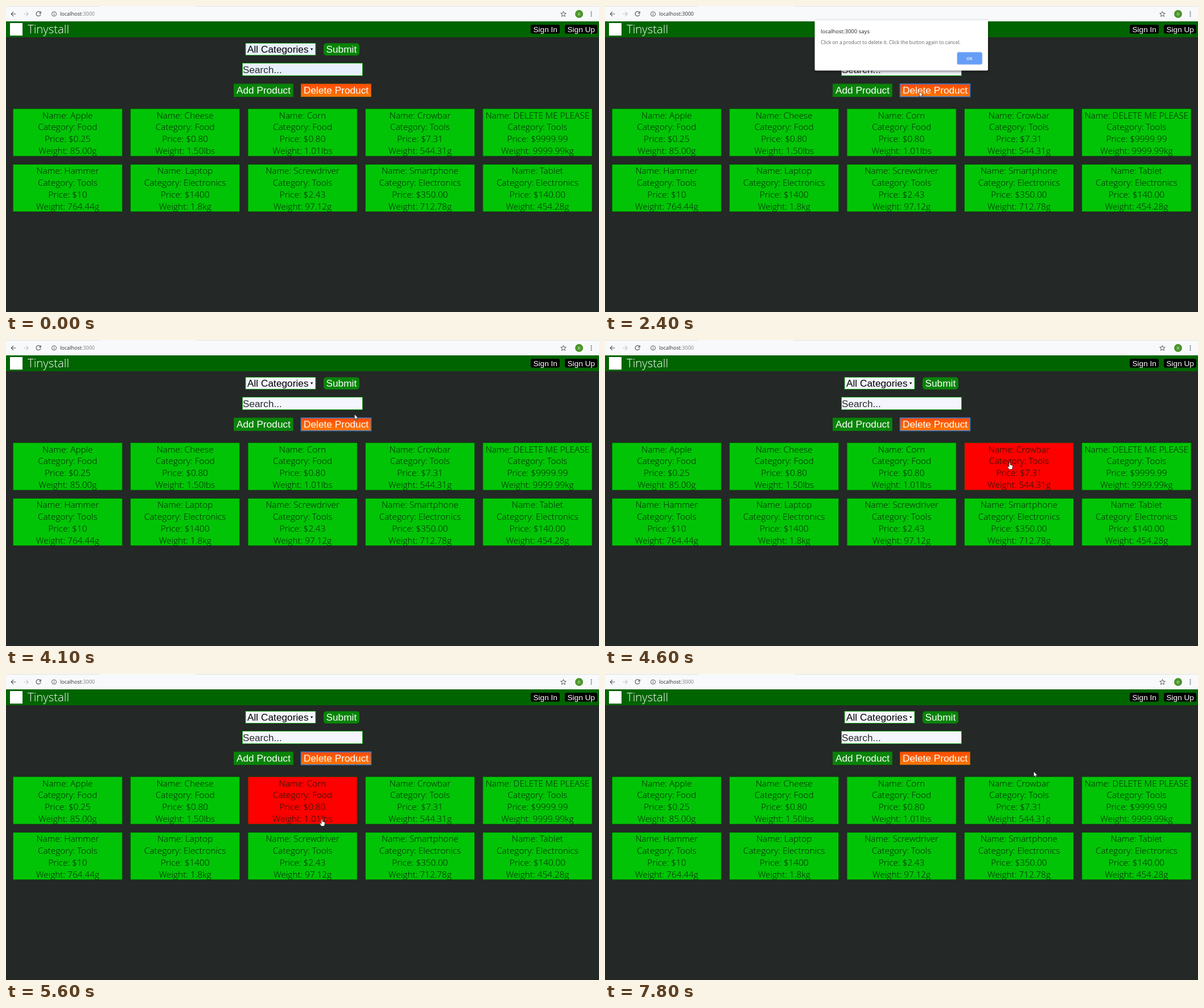
Write an HTML page that moves like this. It is 1042 px wide and 538 px high and loops after 8 s.

```html
<!DOCTYPE html>
<html lang="en">
<head>
<meta charset="utf-8">
<title>Shop demo</title>
<style>
html, body { margin: 0; width: 100%; height: 100%; overflow: hidden; background: #242826; }
svg { display: block; width: 1042px; height: 538px; }
text { white-space: pre; }
.ui { font-family: "Open Sans", "Noto Sans", sans-serif; }
.light { font-family: "Open Sans", "Noto Sans", sans-serif; font-weight: 300; }
.form { font-family: "Liberation Sans", Arial, sans-serif; }
.icon { fill: none; stroke: #55585c; stroke-width: 1.2; }
.pointer { fill: #fff; stroke: #151515; stroke-width: .7; }
</style>
</head>
<body>
<svg viewBox="0 0 1042 538">
  <defs>
    <linearGradient id="orange" x2="0" y2="1"><stop stop-color="#ff4a00"/><stop offset="1" stop-color="#ff7800"/></linearGradient>
    <filter id="blur"><feGaussianBlur stdDeviation="2.5"/></filter>
    <path id="back" d="M17.5 14H9.5M13 10.2L9.2 14L13 17.8"/>
  </defs>
  <rect width="1042" height="538" fill="#242826"/>
  <rect width="1042" height="27" fill="#f8f9fa"/>
  <path d="M0 .5H164M332 .5H1042" stroke="#dfe2e6"/>
  <g class="icon">
    <use href="#back"/>
    <use href="#back" transform="translate(48.5) scale(-1 1)" stroke="#c3c5c8"/>
    <path d="M60.3 11.3A4 4 0 1 0 61 14.6M61.2 9.6V12.6H58.2"/>
    <circle cx="84.5" cy="14" r="4" stroke-width="1"/>
    <path d="M84.5 13.4V16.4M84.5 11.6V12.6" stroke-width="1"/>
    <path id="star" stroke-width="1"/>
    <path d="M1028.5 10.5v0M1028.5 14v0M1028.5 17.5v0" stroke-width="2.2" stroke-linecap="round"/>
  </g>
  <circle cx="1007" cy="14" r="7" fill="#4b962b"/>
  <text class="ui" x="1007" y="16.6" font-size="7" fill="#e8f3e2" text-anchor="middle">R</text>
  <text class="ui" x="95" y="17.2" font-size="9.05" fill="#2b2d30">localhost<tspan id="port">:3000</tspan></text>
  <rect y="27" width="1042" height="28" fill="#006400"/>
  <rect x="7" y="30" width="22" height="22" fill="#fff"/>
  <text class="light" x="38" y="48" font-size="20.4" fill="#fff">Tinystall</text>
  <g id="form" class="form"></g>
  <g id="cards" class="light" font-size="15.4" text-anchor="middle" fill="#021a02"></g>
  <g id="dialog" class="ui">
    <rect x="369" y="27" width="304" height="88" filter="url(#blur)" opacity=".55"/>
    <rect x="368.5" y="25" width="304.5" height="88.5" rx="2" fill="#fff"/>
    <text x="379" y="47.6" font-size="9.54" fill="#202124">localhost:3000 says</text>
    <text x="379" y="67" font-size="8.5" fill="#606367">Click on a product to delete it. Click the button again to cancel.</text>
    <rect x="618.5" y="81" width="44.5" height="22" rx="3" fill="#669df6" stroke="#c6dafc"/>
    <text x="640.5" y="94.6" font-size="7.6" font-weight="600" fill="#fff" text-anchor="middle">OK</text>
  </g>
  <path id="arrow" class="pointer" d="M.3 .3V9.6L2.4 7.7L3.9 11L5.4 10.4L4 7.2H6.8Z"/>
  <path id="hand" class="pointer" d="M-1 .8Q0 -.6 1 .8V4.2L4 5Q5.3 5 5.3 6.5V9L4.2 12.6H-1L-3.5 8.6Q-4 7 -2.5 7L-1 8.3Z"/>
</svg>
<script>
const $ = id => document.getElementById(id);

function add(parent, tag, attrs, text) {
  const el = document.createElementNS("http://www.w3.org/2000/svg", tag);
  for (const k in attrs) el.setAttribute(k, attrs[k]);
  if (text) el.textContent = text;
  return parent.appendChild(el);
}

const star = Array.from({ length: 10 }, (_, i) => {
  const r = i % 2 ? 2.2 : 5, a = i * Math.PI / 5;
  return `${979.5 + r * Math.sin(a)} ${14.4 - r * Math.cos(a)}`;
});
$("star").setAttribute("d", `M${star.join("L")}Z`);

function box(x, y, width, height, label, style, ink = "#fff", size = 17.25, pad = 4.5) {
  const rect = add($("form"), "rect", { x, y, width, height, ...style });
  add($("form"), "text", { x: x + pad, y: y + height / 2 + size * .35, fill: ink, "font-size": size }, label);
  return rect;
}

const black = { fill: "#000", rx: 3 }, field = { stroke: "#16a016" };
box(922, 33, 51, 15.5, "Sign In", black, "#fff", 13.6);
box(982, 33, 57, 15.5, "Sign Up", black, "#fff", 13.6);
const fields = [
  box(421, 65.5, 123, 21, "All Categories", field, "#000", 17.3, 3),
  box(415.5, 100.5, 211, 22, "Search...", field, "#2b2b2b", 17.2, .5)
];
add($("form"), "path", { d: "M535 74.5h4.4l-2.2 3.5Z" });
box(558, 65.5, 63, 21.5, "Submit", { fill: "#078407", rx: 5 });
box(400.5, 137, 104, 22.5, "Add Product", { fill: "#088408", stroke: "#0a760a" });
const del = box(518.5, 137, 123, 22.5, "Delete Product", { fill: "url(#orange)" });

const labels = ["Name", "Category", "Price", "Weight"];
const cards = `Apple|Food|$0.25|85.00g
Cheese|Food|$0.80|1.50lbs
Corn|Food|$0.80|1.01lbs
Crowbar|Tools|$7.31|544.31g
DELETE ME PLEASE|Tools|$9999.99|9999.99kg
Hammer|Tools|$10|764.44g
Laptop|Electronics|$1400|1.8kg
Screwdriver|Tools|$2.43|97.12g
Smartphone|Electronics|$350.00|712.78g
Tablet|Electronics|$140.00|454.28g`.split("\n").map((item, i) => {
  const x = 12.3 + i % 5 * 206.4, y = i < 5 ? 180.7 : 278.4;
  const rect = add($("cards"), "rect", { x, y, width: 192, height: 83.3, stroke: "#064d08", "stroke-width": .8 });
  item.split("|").forEach((value, row) =>
    add($("cards"), "text", { x: x + 96, y: y + 17 + row * 20.7 }, `${labels[row]}: ${value}`));
  return { rect, x, y };
});

// Pointer moves: start, end (100 ms units), from x, y, to x, y
const moves = [
  [2, 4, 57, 1, 420, 92],
  [6, 7, 475, 116, 520, 138],
  [9, 11, 537, 145, 552, 153],
  [24, 29, 552, 150, 545, 110],
  [32, 37, 555, 108, 629, 96],
  [41, 43, 612, 130, 578, 226],
  [45, 49, 640, 215, 924, 215],
  [51, 53, 930, 246, 880, 314],
  [54, 54, 817, 285, 817, 285],
  [55, 56, 690, 258, 555, 255],
  [58, 61, 555, 240, 552, 160],
  [63, 65, 551, 157, 548, 153],
  [68, 73, 575, 159, 860, 209],
  [75, 78, 862, 209, 753, 171]
];

function pointer(n) {
  const m = moves.filter(m => m[0] <= n).pop();
  if (!m) return null;
  const [a, b, x, y, u, v] = m;
  let p = Math.min(1, (n - a) / (b - a || 1));
  if (a === 24 && n < 26) p = 0;
  if (a === 75) p = n < 78 ? 0 : 1;
  return [x + (u - x) * p, y + (v - y) * p];
}

const show = (el, on) => el.style.display = on ? "" : "none";

function draw(n) {
  const [x, y] = pointer(n) || [-50, -50];
  const open = n >= 17 && n < 39, focus = n >= 14 && n < 75;
  const picking = n >= 41 && n < 64 && n !== 54;
  let hand = false;
  for (const c of cards) {
    const hit = picking && x > c.x && x < c.x + 192 && y > c.y && y < c.y + 83.3;
    c.rect.setAttribute("fill", hit ? "#ff0000" : "#02c406");
    hand = hand || hit;
  }
  show($("dialog"), open);
  show($("arrow"), !hand);
  show($("hand"), hand);
  for (const id of ["arrow", "hand"]) $(id).setAttribute("transform", `translate(${x} ${y})`);
  $("port").setAttribute("fill", open ? "#2b2d30" : "#7b7e82");
  fields.forEach(f => f.setAttribute("fill", n < 14 ? "#e8f0fe" : "#f4f5fd"));
  del.setAttribute("stroke", focus ? "#3f78c8" : "#a8650a");
  del.setAttribute("stroke-width", focus ? 1.6 : .8);
}

function tick() {
  draw(Math.floor(performance.now() % 8000 / 100));
  requestAnimationFrame(tick);
}
tick();
</script>
</body>
</html>
```
